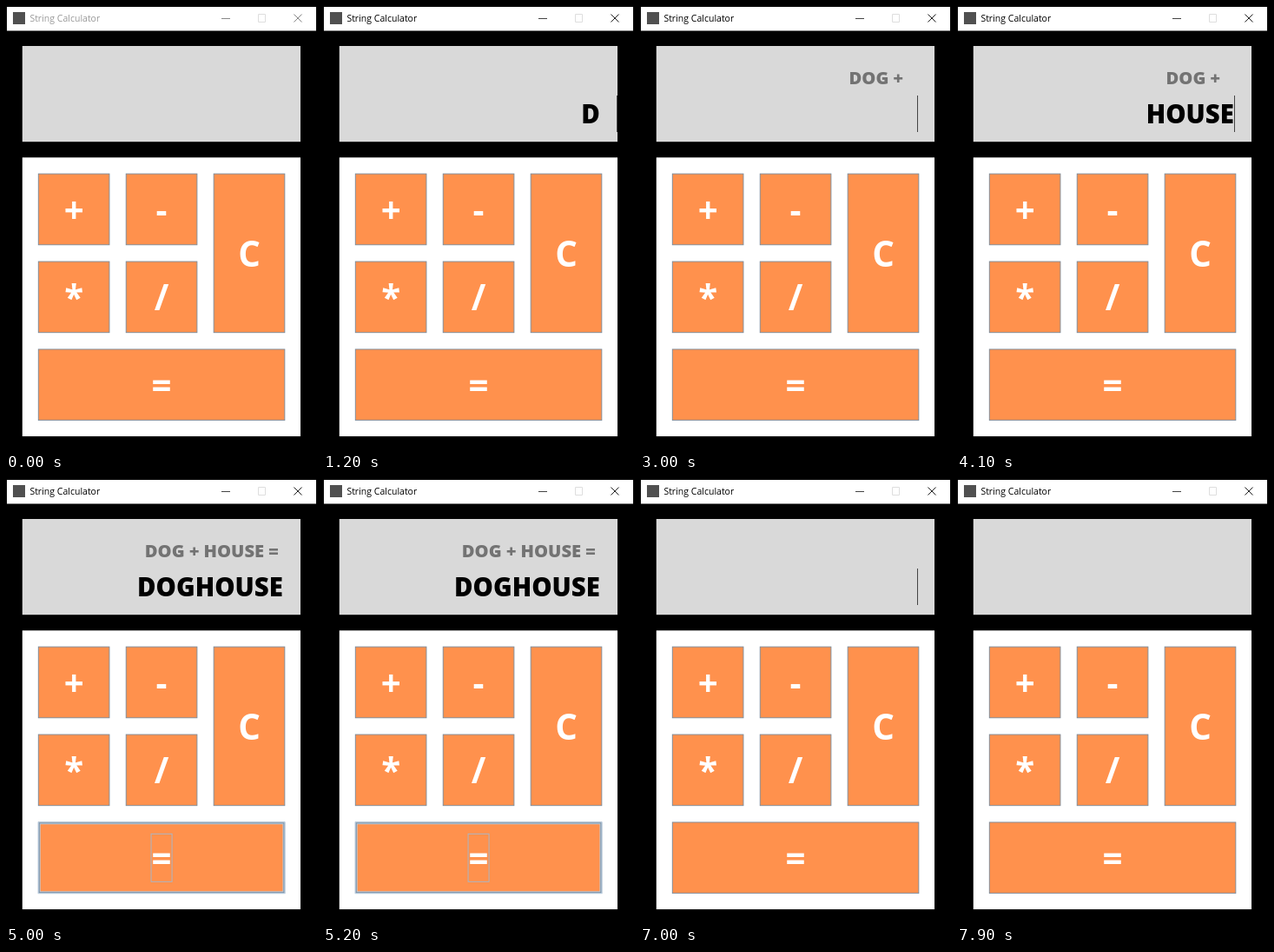
Animation of 358x512 px, one loop 8 s. Source, as an HTML page:

```html
<!DOCTYPE html>
<html lang="en">
<head>
<meta charset="utf-8">
<title>String Calculator</title>
<style>
  html, body { margin: 0; width: 100%; height: 100%; overflow: hidden; background: #000; }
  svg { display: block; width: 100vw; height: 100vh; }
  text { font-family: "Open Sans", "Noto Sans", sans-serif; }
  .label { font-size: 40.3px; font-weight: 700; fill: #fff; text-anchor: middle; }
  .entry { font-size: 29.35px; font-weight: 800; fill: #000; text-anchor: end; }
  .history { font-size: 20.2px; font-weight: 800; fill: #737373; text-anchor: end; }
</style>
</head>
<body>
<svg id="stage" viewBox="0 0 358 512"></svg>
<script>
const LOOP = 8000;
const PX = 0.9176; // one interface pixel in stage units
const stage = document.getElementById("stage");

function add(tag, attrs, content, parent = stage) {
  const el = document.createElementNS("http://www.w3.org/2000/svg", tag);
  for (const key in attrs) el.setAttribute(key, attrs[key]);
  if (content) el.textContent = content;
  parent.appendChild(el);
  return el;
}

function box(x, y, width, height, fill, more, parent) {
  return add("rect", { x, y, width, height, fill, ...more }, "", parent);
}

function show(el, on) {
  el.setAttribute("visibility", on ? "visible" : "hidden");
}

// Window frame and title bar
box(0, 0, 358, 512, "#000");
box(1, 1, 356, 27.5, "#fff");
box(8, 7, 14, 14, "#505050");
const title = add("text", { x: 27.4, y: 18.2, "font-size": 10.53 }, "String Calculator");
const minimize = add("path", { d: "M248 14.5H258", fill: "none" });
add("path", { d: "M290.5 9.5H298.5V18.5H290.5Z", fill: "none", stroke: "#dedede" });
const close = add("path", { d: "M331.5 9.5L340.5 18.5M340.5 9.5L331.5 18.5", fill: "none" });

// Display
box(18.8, 46, 320.2, 110.2, "#d9d9d9");
const history = add("text", { y: 90.3, class: "history" });
const entry = add("text", { x: 318.8, y: 135.2, class: "entry" });
const caret = box(319, 103, 1, 42, "#444");

// Keypad
box(18.8, 174.3, 320.2, 320.8, "#fff");

const PITCH = 110 * PX;
const span = cells => PITCH * cells - 21 * PX;

function makeKey(label, col, row, cols, rows, focusWidth) {
  const x = 37.3 + col * PITCH, y = 193.1 + row * PITCH;
  const w = span(cols), h = span(rows);
  const cx = x + w / 2, cy = y + h / 2;
  box(x, y, w, h, "#ff914d", { stroke: "#7a8a99", "stroke-width": PX });

  const glow = add("g", {});
  const ring = (stroke, width) => box(x + PX, y + PX, w - 2 * PX, h - 2 * PX, "none",
    { stroke, "stroke-width": width * PX }, glow);
  ring("#b8cfe5", 3);
  ring("#7a8a99", 1);

  add("text", { x: cx, y: cy + 15.6, class: "label" }, label);
  const focus = box(cx - focusWidth / 2, cy - 27.5, focusWidth, 55, "none",
    { stroke: "#a3b8cc", "stroke-width": PX });
  return { glow, focus };
}

const keys = {
  plus: makeKey("+", 0, 0, 1, 1, 24),
  minus: makeKey("-", 1, 0, 1, 1, 15),
  times: makeKey("*", 0, 1, 1, 1, 24),
  divide: makeKey("/", 1, 1, 1, 1, 19),
  clear: makeKey("C", 2, 0, 1, 2, 26),
  equals: makeKey("=", 0, 2, 3, 1, 24)
};

const within = (t, from, to) => t >= from && t < to;

function typed(word, t, start, step) {
  return word.slice(0, Math.max(0, Math.floor((t - start) / step) + 1));
}

function entryText(t) {
  if (t < 2400) return typed("DOG", t, 1000, 300);
  if (t < 5000) return typed("HOUSE", t, 3600, 100);
  return t < 6100 ? "DOGHOUSE" : "";
}

function historyText(t) {
  if (within(t, 2400, 5000)) return "DOG +";
  return within(t, 5000, 6500) ? "DOG + HOUSE =" : "";
}

// Hover and focus times per key
const times = {
  plus: { hover: [1900, 2600], focus: [2400, 2700] },
  equals: { hover: [4500, 5800], focus: [5000, 6000] },
  clear: { hover: [5900, 6800], focus: [6100, 6700] }
};

function caretOn(t) {
  return within(t, 900, 2400) || within(t, 2700, 3200) || within(t, 3600, 4500) ||
    within(t, 6700, 7200) || within(t, 7500, 7900);
}

function draw(t) {
  const active = t >= 400;
  title.setAttribute("fill", active ? "#000" : "#999");
  minimize.setAttribute("stroke", active ? "#444" : "#888");
  close.setAttribute("stroke", active ? "#222" : "#888");

  entry.textContent = entryText(t);
  history.textContent = historyText(t);
  history.setAttribute("x", t < 5000 ? 303 : 313.8);
  caret.setAttribute("x", t < 2400 ? 338 : 319);
  show(caret, caretOn(t));

  for (const name in keys) {
    const time = times[name];
    show(keys[name].glow, time && within(t, ...time.hover));
    show(keys[name].focus, time && within(t, ...time.focus));
  }
}

function tick() {
  draw(performance.now() % LOOP);
  requestAnimationFrame(tick);
}
tick();
</script>
</body>
</html>
```
